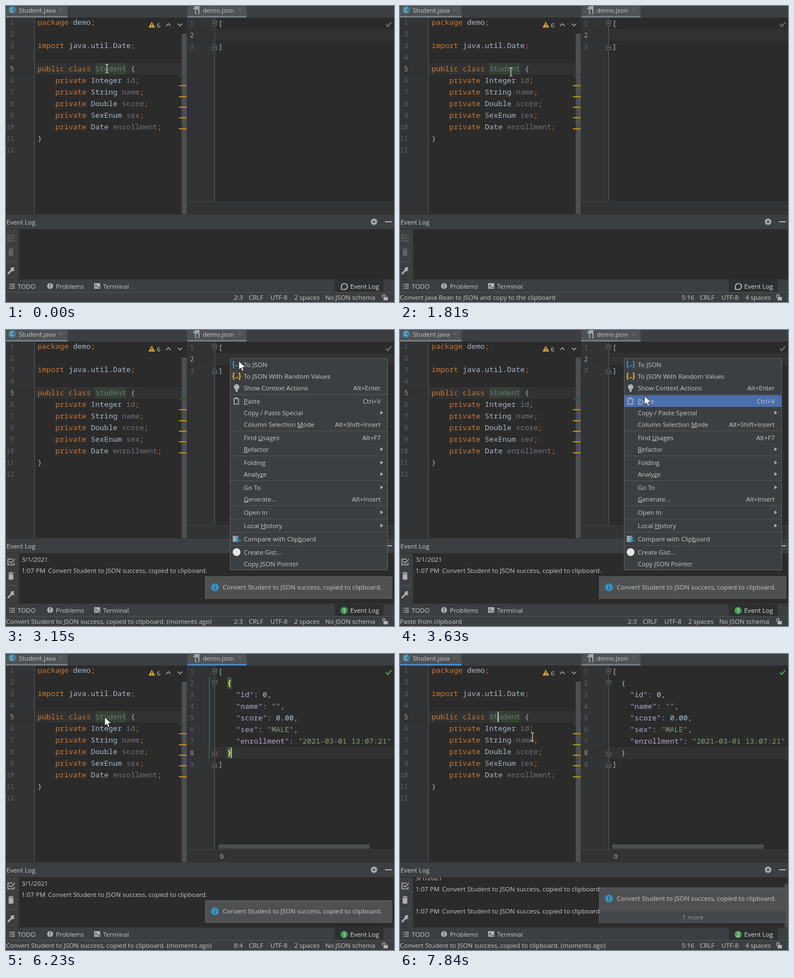
An HTML page for the animation above (8 s loop, 700 by 535 pixels).

```html
<!DOCTYPE html>
<html lang="en">
<head>
<meta charset="utf-8">
<title>Class to JSON</title>
<style>
html, body { margin: 0; width: 100%; height: 100%; overflow: hidden; background: #2b2b2b; }
svg { display: block; width: 700px; height: 535px; }
text { white-space: pre; font: 11.5px "Open Sans", "Noto Sans", sans-serif; fill: #c8c8c8; }
.code, .code tspan { font: 500 13.33px "Noto Sans Mono", "DejaVu Sans Mono", monospace; }
.code { fill: #a9b7c6; }
.num { font: 11.7px "Noto Sans Mono", "DejaVu Sans Mono", monospace; fill: #606366; }
.now { fill: #a4a3a3; }
.kw { fill: #cc7832; }
.dim { fill: #72737a; }
.key { fill: #b6a6dc; }
.val { fill: #a9c4dd; }
.str { fill: #85a073; }
.code .match { fill: #ffef28; font-weight: bold; }
.brace { font: bold 10px "Noto Sans Mono", monospace; }
.mn { text-decoration: underline; }
.line { fill: none; stroke: #afb1b3; stroke-width: 1.4; }
</style>
</head>
<body>
<svg id="stage" viewBox="0 0 700 535"></svg>
<script>
const LOOP = 8000;
const rect = (x, y, w, h, fill, extra = '') =>
  `<rect x="${x}" y="${y}" width="${w}" height="${h}" fill="${fill}" ${extra}/>`;
const text = (x, y, s, extra = '') => `<text x="${x}" y="${y}" ${extra}>${s}</text>`;
const path = (d, extra = 'class="line"') => `<path d="${d}" ${extra}/>`;
const dot = (x, y, r, fill, extra = '') => `<circle cx="${x}" cy="${y}" r="${r}" fill="${fill}" ${extra}/>`;
const span = (cls, s) => `<tspan class="${cls}">${s}</tspan>`;
const during = (times, s) => `<g data-t="${times}">${s}</g>`;
const at = (x, y, s) => `<g transform="translate(${x} ${y})">${s}</g>`;

// Editor rows are 21px tall
const leftY = n => 21 * n + 13;
const rightY = n => 21 * n + 15;
const code = (x, y, s) => text(x, y, s, 'class="code"');
const num = (x, y, n, now) => text(x, y, n, `class="num ${n === now ? 'now' : ''}" text-anchor="end"`);
const close = (x, y) => path(`M${x - 3.5} ${y - 3.5}l7 7m0-7l-7 7`, 'fill="none" stroke="#75787a"');

function tabs() {
  const underline = (x, w, blue) =>
    rect(x, 18, w, 3, '#747a80') + during(blue, rect(x, 18, w, 3, '#4a88c7'));
  return rect(0, 0, 700, 21, '#3c3f41') +
    rect(0, 0, 111, 20, '#4e5254') + rect(327, 0, 107, 20, '#4e5254') +
    underline(0, 111, '1950-2650 6450-6480 7840-8000') +
    underline(327, 107, '2650-3150 4220-6450') +
    dot(11, 7, 7, '#3f7d9c') + text(11, 11, 'C', 'text-anchor="middle" style="fill:#d5dde2"') +
    text(23, 12, 'Student.java') + close(99, 7) +
    path('M342 0h7v9h-2v-3h-9V4z', 'fill="#9aa7b0"') +
    text(339, 14, '{}', 'class="brace" style="fill:#b4bcc2"') +
    text(355, 12, 'demo.json') + close(422, 7);
}

function leftEditor() {
  const kw = s => span('kw', s), dim = s => span('dim', s);
  const fields = [['Integer', 'id'], ['String', 'name'], ['Double', 'score'], ['SexEnum', 'sex'], ['Date', 'enrollment']];
  let s = rect(0, 21, 51, 356, '#313335') + rect(0, 103, 317, 21, '#323232') +
    rect(51, 21, 1, 356, '#555759') + rect(161, 103, 56, 21, '#344134');
  for (let n = 1; n <= 12; n++) s += num(14.5, leftY(n), n, 5);
  s += code(57, leftY(1), kw('package') + ' demo' + kw(';')) +
    code(57, leftY(3), kw('import') + ' java.util.Date' + kw(';')) +
    code(57, leftY(5), kw('public class ') + dim('Student') + ' {') +
    code(57, leftY(11), '}');
  fields.forEach(([type, name], i) => {
    s += code(89, leftY(6 + i), kw('private ') + type + ' ' + dim(name) + kw(';'));
  });
  s += rect(317, 50, 9, 327, '#4d4e4f') + rect(312, 124, 14, 2, '#32503b');
  for (const y of [143, 163, 182, 201, 221]) s += rect(312, y, 14, 2, '#be9117');
  s += path('M263 28.5L269 39H257z', 'fill="#d9a62e"') + rect(262.3, 32, 1.4, 3.5, '#2b2b2b') + rect(262.3, 36.5, 1.4, 1.3, '#2b2b2b') +
    text(272, 38.5, '6') + path('M289 36l4-4 4 4M310 32l4 4 4-4') +
    during('1950-2240 6450-6480 7840-8000', rect(176, 104, 2, 19, '#bbb'));
  return s + rect(326, 0, 1, 377, '#323232');
}

function fold(n, end) {
  const shape = end ? 'M-4 5V-1L0-5 4-1V5z' : 'M-4-5V1L0 5 4 1V-5z';
  return at(376.5, rightY(n) - 4, path(shape, 'fill="#313335" stroke="#6f7274"') +
    path(end ? 'M-2 1h4' : 'M-2-1h4', 'stroke="#8a8d8f"'));
}

function rightEditor() {
  const key = s => span('key', `"${s}"`), str = s => span('str', `"${s}"`), val = s => span('val', s);
  const numbers = (count, now) => Array.from({ length: count }, (_, i) => num(339, rightY(i + 1), i + 1, now)).join('');
  const row = n => rect(327, 21 * n, 373, 21, '#323232');
  const rule = rect(376, 21, 1, 332, '#555759');
  const body = [
    key('id') + ': ' + val('0') + ',',
    key('name') + ': ' + str('') + ',',
    key('score') + ': ' + val('0.00') + ',',
    key('sex') + ': ' + str('MALE') + ',',
    key('enrollment') + ': ' + str('2021-03-01 13:07:21')
  ].map((s, i) => code(415, rightY(3 + i), s)).join('');
  const braces = cls => code(399, rightY(2), span(cls, '{')) + code(399, rightY(8), span(cls, '}'));
  const check = color => path('M685.5 33.5l3 3.5 6.5-7.5', `fill="none" stroke="${color}" stroke-width="2.4"`);

  return rect(327, 21, 50, 332, '#313335') +
    during('0-4220', row(2) + rule + numbers(3, 2) + code(383, rightY(3), ']') + fold(3, true)) +
    during('4220-8000', row(8) + rule + numbers(9, 8) + body + code(383, rightY(9), ']') +
      fold(2) + fold(8, true) + fold(9, true) + rect(383, 344, 273, 8, '#4d4e4f')) +
    code(383, rightY(1), '[') + fold(1) +
    during('4220-4440 6450-8000', braces('')) +
    during('4440-6450', rect(399, 42, 8, 21, '#3b514d') + rect(399, 168, 8, 21, '#3b514d') +
      rect(366, 44, 1.5, 145, '#3b6663') + braces('match')) +
    during('2780-3150', rect(399, 43, 2, 19, '#bbb')) +
    during('4220-4440 5390-5810 6160-6450', rect(405.5, 169, 2, 19, '#bbb')) +
    during('0-4440', check('#6b6e70')) + during('4440-8000', check('#499c54')) +
    rect(327, 353, 373, 24, '#313335') + rect(327, 353, 373, 1, '#3c3f41') +
    during('4220-8000', text(386, 370, '0'));
}

function eventLog() {
  const message = 'Convert Student to JSON success, copied to clipboard.';
  const entry = y => text(28, y, '1:07 PM') + text(76, y, message);
  const tools = color => `<g fill="none" stroke="${color}" stroke-width="1.6">` +
    path('M12 414H3.5v10.5h11v-4M6 418l3 3 7-7', '') +
    path('M5.5 442h7v8.500h-7zM4 439.500h10M7.500 438h3', `fill="${color}" stroke-width="1.3"`) + '</g>';
  const gear = Array.from({ length: 8 }, (_, i) =>
    `<rect x="-1.3" y="-6.3" width="2.6" height="4" fill="#afb1b3" transform="rotate(${i * 45})"/>`).join('');
  const info = y => dot(377, y, 7, '#3592c4') + rect(376.2, y - 1, 1.7, 5, '#4e5052') +
    rect(376.2, y - 4, 1.7, 1.8, '#4e5052') + text(391, y + 4, message);
  const frame = 'stroke="#565a5c"';

  return rect(0, 376, 700, 28, '#3c3f41') + rect(0, 376, 700, 1, '#323232') + rect(0, 403, 700, 1, '#323232') +
    text(1, 395, 'Event Log') +
    at(664, 390, gear + dot(0, 0, 3.3, 'none', 'stroke="#afb1b3" stroke-width="2.4"')) +
    rect(684, 389, 12, 2, '#afb1b3') +
    rect(0, 404, 23, 90, '#3c3f41') + rect(23, 404, 677, 90, '#2b2b2b') + rect(23, 404, 1, 90, '#323232') +
    during('0-2240', tools('#616466')) + during('2240-8000', tools('#afb1b3')) +
    rect(2, 461, 17, 1, '#555759') +
    path('M4 483.5l6-6', 'stroke="#afb1b3" stroke-width="3" stroke-linecap="round"') +
    path('M14.5 473.5a3.3 3.3 0 1 0 .5 3.5l-3-.5z', 'fill="#afb1b3" stroke="#afb1b3"') +
    during('1950-7840', text(28, 419, '3/1/2021') + entry(439)) +
    during('7840-8000', '<clipPath id="log"><path d="M24 404h676v90H24z"/></clipPath><g clip-path="url(#log)">' +
      text(28, 409, '3/1/2021') + entry(429) + entry(469) + '</g>' + rect(694, 415, 6, 79, '#4d4e4f')) +
    during('1950-7840', rect(359.5, 445.5, 337, 40, '#4e5052', frame) + info(465)) +
    during('7840-8000', rect(359.5, 422.5, 337, 63, '#43474a', frame) + rect(360, 423, 336, 42, '#4e5052') +
      info(442) + text(528.5, 480, '1 more', 'text-anchor="middle" style="fill:#999"'));
}

function statusBar() {
  const bean = 'Convert Java Bean to JSON ';
  const left = [
    ['1310-1950 3200-3400 6880-7060', bean + 'and copy to the clipboard'],
    ['3400-3550 7060-7840', bean + 'with random values and copy to the clipboard'],
    ['3600-4220', 'Paste from clipboard'],
    ['1950-3200 4220-6880 7840-8000', 'Convert Student to JSON success, copied to clipboard. (moments ago)']
  ];
  const spots = list => list.map(([x, s]) => text(x, 531, s)).join('');
  const json = spots([[438, 'CRLF'], [477, 'UTF-8'], [520, '2 spaces'], [576, 'No JSON schema']]);
  const java = spots([[508, '5:16'], [541, 'CRLF'], [580, 'UTF-8'], [623, '4 spaces']]);
  const badge = n => dot(610, 507, 6.5, '#499c54') + text(610, 511, n, 'text-anchor="middle" style="fill:#fff;font-size:10px"');

  return rect(0, 494, 700, 41, '#3c3f41') + rect(0, 494, 700, 1, '#323232') + rect(0, 517, 700, 1, '#505355') +
    rect(593, 495, 88, 22, '#2d2f30') +
    path('M9 503h7M9 506.5h7M9 510h7M6 503h2M6 506.5h2M6 510h2') + text(21, 511, 'TODO') +
    dot(79.5, 506, 5.3, '#afb1b3') + rect(78.7, 502.5, 1.6, 4.5, '#3c3f41') + rect(78.7, 508, 1.6, 1.6, '#3c3f41') +
    text(90, 511, 'Problems') +
    rect(159, 501, 11, 10, '#afb1b3') + path('M161 503.5l2.5 2.5-2.5 2.5M165 508.5h4', 'fill="none" stroke="#3c3f41" stroke-width="1.3"') +
    text(175, 511, 'Terminal') +
    during('0-1950', path('M605 512v-5a5.5 5.5 0 1 1 5.5 5.5z', 'fill="none" stroke="#c4c6c8" stroke-width="1.6"')) +
    during('1950-7840', badge(1)) + during('7840-8000', badge(2)) +
    text(621, 511, 'Event Log', 'style="fill:#ddd"') +
    left.map(([times, s]) => during(times, text(0, 531, s))).join('') +
    during('0-1310 2650-6660', json) + during('0-1310 2650-4220', text(411, 531, '2:3')) +
    during('4220-6450', text(411, 531, '8:4')) + during('6450-6660', text(405, 531, '5:16')) +
    during('1310-2650 6660-8000', java) +
    rect(681, 526, 8, 6, '#afb1b3') + path('M679.5 527v-3a2.3 2.3 0 0 1 4.6 0v2');
}

// Label (underscore before its mnemonic), right side, icon; null is a separator
const ITEMS = [
  ['To JSON', '', 'blue'], ['To JSON With Random Values', '', 'gold'], ['Show Context Actions', 'Alt+Enter', 'bulb'], null,
  ['_Paste', 'Ctrl+V', 'clip'], ['Copy / Paste Special', '>'], ['Column Selection _Mode', 'Alt+Shift+Insert'], null,
  ['Find _Usages', 'Alt+F7'], ['_Refactor', '>'], null,
  ['Folding', '>'], ['Analy_ze', '>'], null,
  ['Go To', '>'], ['_Generate...', 'Alt+Insert'], null,
  ['Open In', '>'], null, ['Local _History', '>'], null,
  ['Compare with Clip_board', '', 'diff'], null, ['Create Gist...', '', 'disc'], ['Copy JSON Pointer', '']
];
const braceIcon = color => path('M8-5.5H6.5V-1.500L5 0l1.500 1.500V5.500H8M16-5.5h1.500v4L19 0l-1.500 1.500v4H16M9.500 2.500h2m1 0h2',
  `fill="none" stroke="${color}" stroke-width="1.8"`);
const board = path('M7.5-4.5h8V5.5h-8zM9.5-6h4', 'fill="none" stroke="#afb1b3" stroke-width="1.7"');
const ICONS = {
  blue: braceIcon('#3592c4'),
  gold: braceIcon('#f0ab3c'),
  bulb: dot(12, -1.5, 5, '#afb1b3') + rect(10, 3, 4, 4, '#afb1b3'),
  clip: board,
  diff: rect(5, -5.5, 9, 11, '#9aa7b0') + path('M20 3h-8m3-3.5L11.500 3l3.500 3.500M9-2.500h8', 'fill="none" stroke="#3592c4" stroke-width="2.2"'),
  disc: dot(12, 0, 7, '#e6e6e6')
};

function menu(x, y, times, items, picks) {
  let top = 1, rows = '', marks = '', index = 0;
  for (const item of items) {
    if (!item) {
      rows += rect(1, top + 1, 283, 1, '#515355');
      top += 3;
      continue;
    }
    const [label, side, icon] = item;
    if (picks[index]) marks += during(picks[index], rect(1, top, 283, 21, '#4b6eaf'));
    rows += at(0, top + 10.5, (ICONS[icon] || '') +
      text(25, 4, label.replace(/_(.)/, '<tspan class="mn">$1</tspan>')) +
      (side === '>' ? path('M271.5-3.5l5 3.5-5 3.5z', 'fill="#afb1b3"') : text(272, 4, side, 'text-anchor="end"')));
    top += 21;
    index++;
  }
  return during(times, at(x, y, rect(.5, .5, 284, top, '#3c3f41', 'stroke="#616161"') + marks + rows));
}

const pointers =
  `<g id="arrow">${path('M0 0V16l3.7-3.5 2.6 6 2.8-1.2-2.6-5.7H12z', 'fill="#fff" stroke="#111" stroke-width=".9"')}</g>` +
  `<g id="beam">${path('M-3-7.5h2l1 1 1-1h2M0-6.5V6.5M-3 7.5h2l1-1 1 1h2', 'fill="none" stroke="#dedede" stroke-width="1.2"')}</g>`;

const shortItems = ITEMS.slice(0, -1);
const stage = document.getElementById('stage');
stage.innerHTML = rect(0, 0, 700, 535, '#2b2b2b') + leftEditor() + rightEditor() + tabs() + eventLog() + statusBar() +
  menu(179, 112, '1110-1730', shortItems, ['1310-1730']) +
  menu(404, 51, '3150-4080', ITEMS, ['3200-3400', '3400-3550', '3550-3600', '3600-4080']) +
  menu(178, 114, '6480-7560', shortItems, ['6880-7060', '7060-7560']) + pointers;

// Pointer steps: time, x, y, shape
const MOVES = [
  [0, 182, 113, 'beam'], [800, 172, 108, 'beam'], [930, 179, 112, 'arrow'],
  [1310, 188, 117, 'arrow'], [1380, 199, 119, 'arrow'], [1730, 198, 114, 'beam'], [1810, 200, 119, 'beam'],
  [2240, 310, 82, 'beam'], [2270, 404, 52, 'beam'],
  [3150, 420, 56, 'arrow'], [3200, 423, 62, 'arrow'], [3400, 430, 80, 'arrow'],
  [3550, 436, 99, 'arrow'], [3600, 441, 119, 'arrow'], [3680, 444, 121, 'arrow'], [4080, 444, 121, 'beam'],
  [4440, 0, 0, ''], [5390, 182, 116, 'beam'],
  [5810, 185, 140, 'beam'], [5880, 189, 180, 'beam'], [5950, 191, 215, 'beam'], [6020, 189, 180, 'beam'],
  [6090, 185, 140, 'beam'], [6160, 182, 115, 'beam'], [6230, 178, 114, 'arrow'],
  [6660, 186, 122, 'arrow'], [6880, 202, 136, 'arrow'], [7060, 212, 142, 'arrow'],
  [7560, 226, 146, 'beam'], [7660, 239, 150, 'beam']
];
const parts = [...stage.querySelectorAll('[data-t]')].map(el => ({
  el, spans: el.dataset.t.split(' ').map(s => s.split('-').map(Number))
}));
const shapes = ['arrow', 'beam'].map(id => document.getElementById(id));

function show(el, on) {
  el.style.display = on ? '' : 'none';
}

function draw() {
  const t = performance.now() % LOOP;
  for (const { el, spans } of parts) show(el, spans.some(([a, b]) => t >= a && t < b));
  const [, x, y, shape] = MOVES.findLast(m => m[0] <= t);
  for (const el of shapes) {
    show(el, el.id === shape);
    el.setAttribute('transform', `translate(${x} ${y})`);
  }
  requestAnimationFrame(draw);
}
draw();
</script>
</body>
</html>
```
